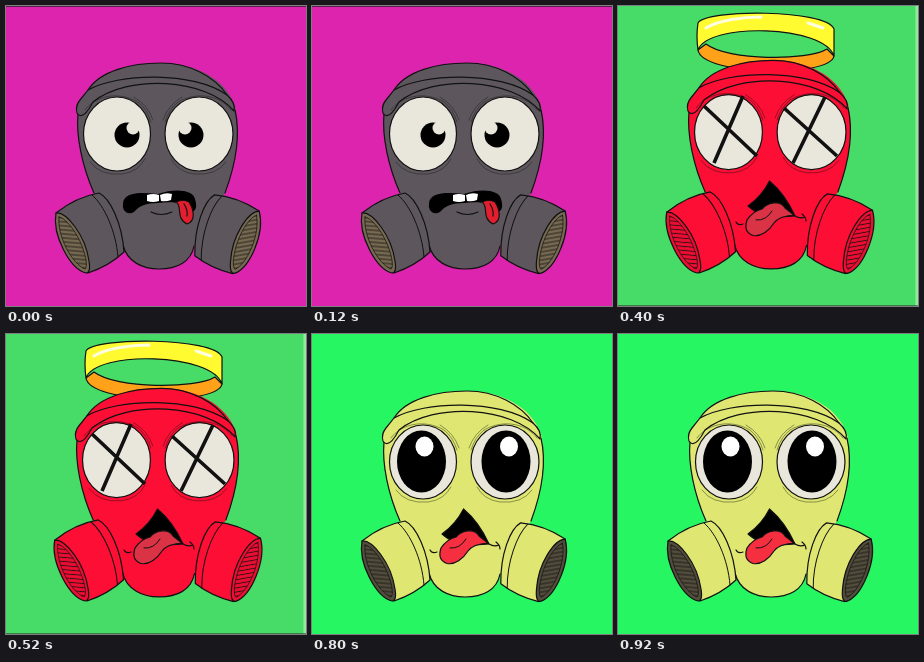
An HTML page that plays this animation: 300x300 px, repeating every 1 s.

```html
<!DOCTYPE html>
<html lang="en">
<head>
<meta charset="utf-8">
<title>Gas mask moods</title>
<style>
  html, body { margin: 0; width: 100%; height: 100%; overflow: hidden; }
  svg { display: block; width: 100vw; height: 100vh; }
  .ink { fill: none; stroke: #111; stroke-width: 1.2; stroke-linecap: round; stroke-linejoin: round; }
  .skin { fill: var(--skin); }
  .thin { stroke-width: .6; opacity: .7; }
  .lens { fill: #e9e6db; }
  .bold { stroke-width: 3.6; stroke-linecap: butt; }
  .tooth { fill: #fff6df; stroke-width: .8; }
  .shine { fill: none; stroke: #ffc4cf; stroke-width: 1.8; stroke-linecap: round; }
  #mask { transform-origin: 151px 267px; transform: scale(var(--zoom)); }
</style>
</head>
<body>
<svg viewBox="0 0 300 300">
  <defs>
    <pattern id="slats" width="8" height="4" patternUnits="userSpaceOnUse" patternTransform="rotate(5)">
      <path d="M0 2H8" stroke="#151210" stroke-opacity=".85"/>
    </pattern>
    <radialGradient id="glow">
      <stop offset="0" stop-color="#ff4b4b" stop-opacity=".9"/>
      <stop offset=".4" stop-color="#ff6a6a" stop-opacity=".5"/>
      <stop offset="1" stop-color="#ff8080" stop-opacity="0"/>
    </radialGradient>
    <radialGradient id="iris">
      <stop offset=".4" stop-color="#7fabd8"/>
      <stop offset="1" stop-color="#4a78b0"/>
    </radialGradient>
    <filter id="soft" x="-60%" y="-10%" width="220%" height="120%"><feGaussianBlur stdDeviation="4.5"/></filter>
    <filter id="haze" x="-60%" y="-10%" width="220%" height="120%"><feGaussianBlur stdDeviation="1.1"/></filter>

    <g id="can" class="ink">
      <path class="skin" d="M50 207C60 199 76 190 93 187C104 192 116 217 118 246Q103 260 82 267Z"/>
      <path d="M86 189C98 199 110 225 112 251" stroke-width="1"/>
      <path d="M50 207C60 206 79 228 83 255Q85 267 80 267C64 263 46 229 50 207Z" fill="var(--end)"/>
      <path d="M53 211C61 212 76 232 80 254Q81 262 79 263C66 258 51 230 53 211Z" fill="url(#slats)" stroke-width=".7"/>
    </g>
    <g id="folds" class="ink thin">
      <path d="M79 104C88 91 111 84 132 96Q141 103 145 116M84 156Q94 170 116 168Q132 166 139 153M128 91Q142 99 147 114"/>
    </g>
    <g id="pupil">
      <circle cx="121" cy="129" r="12.5"/>
      <circle class="lens" cx="127" cy="122" r="6.5"/>
    </g>
    <g id="stare">
      <ellipse cx="109.5" cy="127.5" rx="24.5" ry="31"/>
      <ellipse cx="112.5" cy="112.5" rx="9" ry="10" fill="#fff"/>
    </g>
    <g id="almond">
      <path class="ink" d="M77 127C88 115 105 110 122 114Q137 117 145 127C137 143 121 149 106 148Q87 145 77 127Z" style="fill:#fff"/>
      <path class="ink" d="M77 127C88 115 105 110 122 114Q137 117 145 127" stroke-width="2"/>
    </g>
    <g id="ball">
      <circle class="ink" r="13.5" style="fill:url(#iris)"/>
      <circle r="6"/>
      <circle cx="-4" cy="-5" r="2.6" fill="#fff"/>
    </g>
    <g id="drool" class="ink">
      <path d="M151.5 175Q144 190 130 200Q138 207 150 212L177 210Q167 188 151.5 175Z" style="fill:#000"/>
      <path d="M118 216Q120 220 125 218M177 210Q182 213 187 211M184 208Q188 211 188 215"/>
      <path d="M176 209Q161 210 156 217C151 225 143 231 135 229.5Q125 226 129 214Q135 205 144 203C150 196 163 194 167 202Q172 206 176 209Z" style="fill:var(--tongue)"/>
      <path d="M138 214Q148 215 154 205" stroke-width="1"/>
    </g>
    <g id="beam">
      <path d="M130 131L77 300" stroke="#ff1717" stroke-width="17" opacity=".75" filter="url(#soft)"/>
      <path d="M129 131L132 131L82 302L71 302Z" fill="#ff6b70" stroke="#ff4d55" stroke-width="2" filter="url(#haze)"/>
      <path d="M129.5 131L131.5 131L80 302L74 302Z" fill="#fff1f1"/>
    </g>
    <g id="burst">
      <ellipse cx="116" cy="129" rx="32" ry="33" fill="url(#glow)"/>
      <path id="rays" fill="none" stroke="#ff9b94" stroke-width="1" opacity=".45"/>
      <circle cx="130" cy="131" r="12" fill="#c25050" fill-opacity=".55" stroke="#6e2020" stroke-width="1.2"/>
      <circle cx="130" cy="131" r="8" fill="none" stroke="#8f2424" stroke-width="2" stroke-dasharray="1.5 1.5"/>
      <circle cx="130" cy="131" r="6" fill="#ff8580" filter="url(#haze)"/>
    </g>
  </defs>

  <rect width="300" height="300" fill="var(--bg)"/>
  <path data-on="03" d="M0 .5H300" stroke="#222" stroke-opacity=".7"/>
  <g data-on="2">
    <path d="M298.7 0V300" stroke="#92e89f" stroke-width="2.6"/>
    <path d="M0 299.5H300" stroke="#222" stroke-opacity=".5"/>
  </g>

  <g data-on="2" class="ink">
    <path d="M80 44C84 70 212 72 216 50L209 43C190 55 110 55 88 38Z" style="fill:#ffa21a"/>
    <path d="M80 17C88 3 208 3 216 23V50C206 19 90 16 80 44Q78 30 80 17Z" style="fill:#fffb30"/>
    <path d="M88 22C101 14 126 11 143 11M190 17L205 22" style="stroke:#fffde0" stroke-width="3"/>
  </g>

  <g id="mask">
    <g class="ink">
      <path class="skin" d="M72 105C70 130 76 160 88 187L117 239C121 256 137 263 153 263C171 263 185 256 188 240L219 187C229 160 235 130 229 100C219 72 188 57 155 57C112 57 79 74 72 105Z" stroke="none"/>
      <path d="M72 108C70 130 76 160 88 187M117 239C121 256 137 263 153 263C171 263 185 256 188 240M219 187C229 160 235 130 229 104"/>
      <path class="skin" d="M71 107Q69 100 74 94L82 84C94 65 125 57 155 57C184 57 209 71 221 89Q230 97 228 105C200 72 122 68 87 96Q79 111 74 109.500Q72 109 71 107Z"/>
      <path d="M82 84C112 67 187 65 221 89"/>
    </g>
    <use href="#folds"/>
    <use href="#folds" transform="matrix(-1 0 0 1 304 0)"/>
    <use href="#can"/>
    <use href="#can" transform="translate(1 1.500) rotate(-5 213 215) matrix(-1 0 0 1 303 0)"/>
    <g data-on="0234" class="ink">
      <ellipse class="lens" cx="111" cy="128" rx="33.5" ry="37"/>
      <ellipse class="lens" cx="193" cy="128" rx="34" ry="37"/>
    </g>
  </g>

  <g data-on="0">
    <use href="#pupil"/>
    <use href="#pupil" transform="matrix(-1 0 0 1 306 0)"/>
    <path d="M117 198C117 186 135 186 152 188C170 182 187 184 189 193C192 202 189 207 184 205C180 196 165 195 152 197C140 197 133 200 128 206C121 210 116 204 117 198Z"/>
    <path d="M141 189Q147 187 153 189V195Q147 197 141 195ZM154 189Q160 186 166 188L165 194Q160 196 155 195Z" fill="#fff"/>
    <path class="ink" d="M170 196C177 200 169 212 181 218C190 215 188 204 183 196Q177 193 170 196Z" style="fill:#e21f2e"/>
    <path class="ink" d="M178 198Q182 204 181 210M145 206Q155 211 166 206" stroke-width="1"/>
  </g>

  <g data-on="1">
    <use href="#almond"/>
    <use href="#almond" transform="matrix(-1 0 0 1 304 0)"/>
    <use href="#ball" x="102" y="132"/>
    <use href="#ball" x="183.500" y="132"/>
    <path class="shine" d="M116 96Q130 99 136 111M203 94Q214 100 219 114M81 143Q86 154 96 159M166 145Q170 155 178 160"/>
    <path class="ink" d="M152 170C135 171 126 186 124 205Q122 228 128 240Q150 252 176 240Q184 222 181 204C178 186 168 170 152 170Z" style="fill:#d5283f"/>
    <path class="ink" d="M152 177C139 177 129 188 126 206Q124 228 130 239Q150 248 175 239Q182 222 179 205C175 187 165 177 152 177Z" style="fill:#35249a"/>
    <path d="M138 212Q153 203 172 212L176 222Q153 214 137 224Z" fill="#120a35"/>
    <g class="ink">
      <path class="tooth" d="M128 196L127 218Q132 210 134 188ZM133 188Q132 202 135 213Q140 202 142 180ZM141 180Q140 196 146 208Q152 196 152 178ZM152 178Q152 196 158 208Q164 196 163 180ZM162 180Q163 200 169 213Q172 202 171 188ZM170 188Q172 206 178 218Q179 206 177 196Z"/>
      <path class="tooth" d="M125 216Q130 224 131 238L127 234ZM130 240Q128 226 132 216Q138 228 139 243ZM171 243Q170 228 174 214Q177 226 175 240ZM175 238Q176 222 180 212Q182 226 178 238Z"/>
      <path d="M139 222C143 214 150 218 155 220C160 216 170 214 175 221C176 240 168 262 163 280Q160 293 157 294Q152 291 151 278C149 258 139 245 139 222Z" style="fill:#d41f3c"/>
      <path d="M155 221Q159 238 157 258" stroke-width=".7"/>
      <path d="M116 216Q117 220 120 221M183 220Q186 219 187 215"/>
    </g>
    <path class="shine" d="M146 227L145 231M147 236L148 238M158 276L157 284"/>
  </g>

  <g data-on="2">
    <path class="ink bold" d="M125 90L96 157M86 100L139 150M207 91L175 157M166 102L219 150"/>
  </g>
  <use data-on="24" href="#drool"/>

  <g data-on="3">
    <path class="ink" d="M122 180C128 167 176 165 180 179C179 195 185 212 184 227C180 252 134 254 125 232C117 215 125 198 122 180Z" style="fill:#080408"/>
    <path d="M132 172Q141 167 151 169L150 182Q143 188 135 183ZM152 169Q162 167 171 171L169 181Q161 185 153 181Z" fill="#fff"/>
    <path d="M131 235C127 221 136 208 146 210Q151 206 159 205C172 206 178 219 175 232C168 250 138 252 131 235Z" fill="#ea1b31"/>
    <path class="ink" d="M138 214Q149 217 157 206" stroke-width="1"/>
    <use href="#burst"/>
    <use href="#burst" transform="matrix(-1 0 0 1 304 0)"/>
    <path d="M122 131H182" stroke="#ff4a4a" stroke-width="5" opacity=".35"/>
    <use href="#beam"/>
    <use href="#beam" transform="matrix(-1 0 0 1 304 0)"/>
    <circle cx="130" cy="132" r="4" fill="#fff" filter="url(#haze)"/>
    <circle cx="174" cy="132" r="4" fill="#fff" filter="url(#haze)"/>
  </g>

  <g data-on="4">
    <use href="#stare"/>
    <use href="#stare" x="84.500"/>
  </g>
</svg>
<script>
  const HOLD = 200;
  const moods = [
    { bg: '#dc24ae', skin: '#5d575d', end: '#776a52', zoom: 1 },
    { bg: '#43dd67', skin: '#fd0e38', end: '#ee0d35', zoom: 1 },
    { bg: '#47db68', skin: '#fd0e34', end: '#ee0d33', zoom: 1.013, tongue: '#d93345' },
    { bg: '#db6740', skin: '#7f3fd3', end: '#57524a', zoom: 1 },
    { bg: '#27f663', skin: '#dfe772', end: '#524d3c', zoom: 1, tongue: '#f52f40' }
  ];
  const root = document.querySelector('svg');
  const parts = [...document.querySelectorAll('[data-on]')];

  // Light rays fanning out over the lens from the pupil
  let rays = '';
  for (let i = 0; i < 22; i++) {
    const a = i * Math.PI / 11, c = Math.cos(a), s = Math.sin(a);
    const r = c < 0 ? 30 : 14;
    rays += `M${130 + 11 * c} ${131 + 11 * s}L${130 + r * c} ${131 + r * s}`;
  }
  document.getElementById('rays').setAttribute('d', rays);

  let shown = -1;
  function show(n) {
    if (n === shown) return;
    shown = n;
    for (const [key, value] of Object.entries(moods[n])) root.style.setProperty('--' + key, value);
    for (const part of parts) part.style.display = part.dataset.on.includes(n) ? '' : 'none';
  }

  function tick() {
    show(Math.floor(performance.now() / HOLD) % moods.length);
    requestAnimationFrame(tick);
  }
  tick();
</script>
</body>
</html>
```
